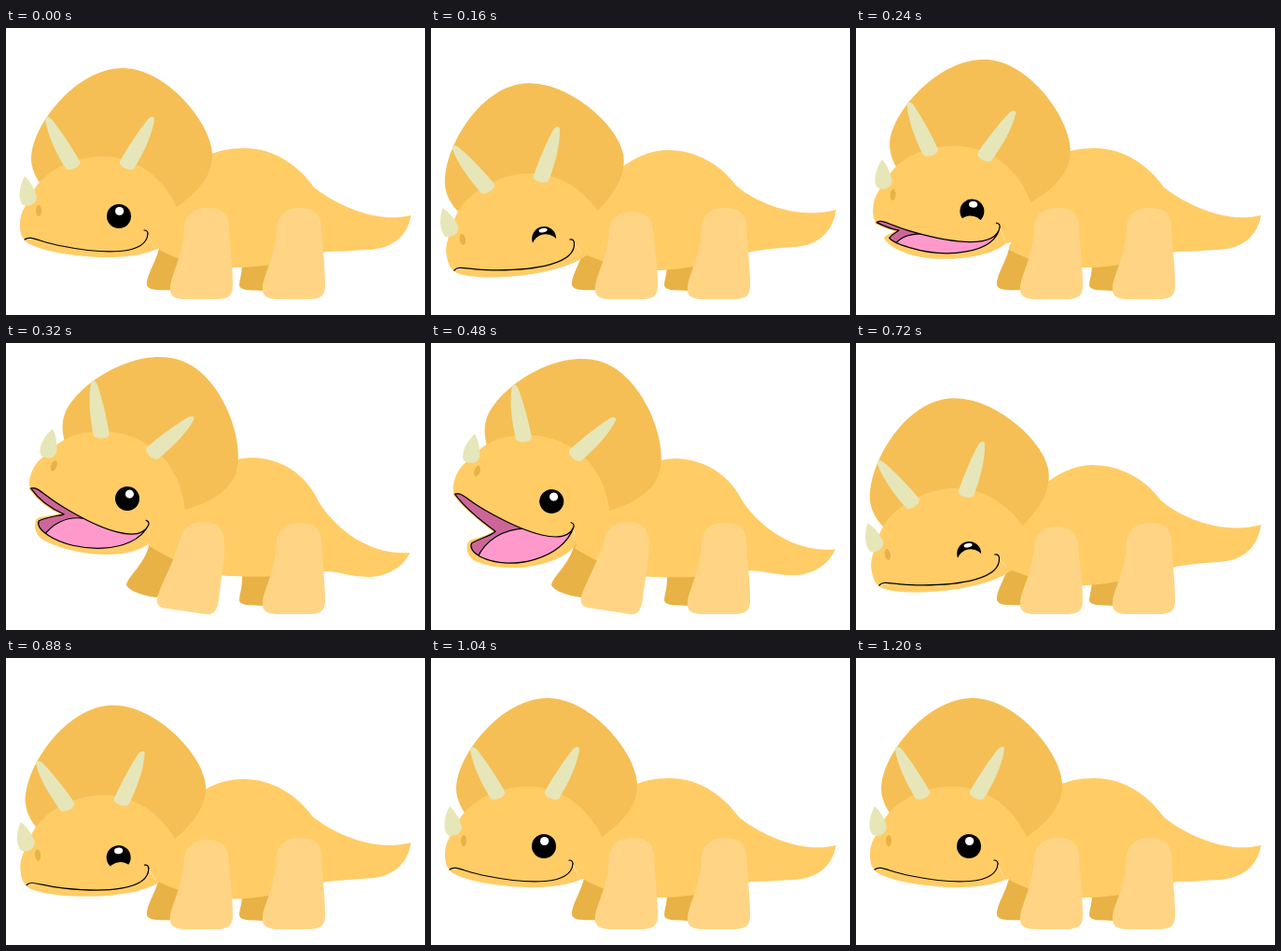
Animation, 449 px wide and 308 px high, one loop 1.44 s. Source, as an HTML page with a canvas:

```html
<!DOCTYPE html>
<html lang="en">
<head>
<meta charset="utf-8">
<title>Dinosaur</title>
<style>
  html, body { margin: 0; width: 100%; height: 100%; overflow: hidden; background: #fff; }
  canvas { display: block; width: 449px; height: 308px; }
</style>
</head>
<body>
<canvas id="stage" width="449" height="308"></canvas>
<script>
const ctx = document.getElementById('stage').getContext('2d');
const LOOP = 1440, TICK = 80;
const SKIN = '#ffcc66', FRILL = '#f5bf55', LEG = '#ffd585', SHADE = '#e8b246',
      HORN = '#e6e6b8', MOUTH = '#cc6699', TONGUE = '#ff99cc';
const PIVOT = { x: 121, y: 202 };   // eye centre in the resting pose

// head x, head y, head angle, mouth (0 shut, 1 half, 2 wide), eye open,
// body and foreleg (0 crouched, 1 resting, 2 raised)
const rest   = [121, 202, 0, 0, 1, 1, 1];
const crouch = [119.5, 217.2, -10.5, 0, 0, 0, 0];
const rear   = [130, 167, 20, 1, 1, 2, 2];
const peak   = [131, 162, 21.5, 1.3, 1, 2.08, 2.05];
const roar   = [127.5, 178, 15, 2, 1, 1.62, 2.12];
const nod    = [123, 198, 3.5, 0, 1, 1, 1];
const keys = [
  [0, rest], [160, crouch], [320, rear], [400, peak], [560, roar],
  [720, crouch], [1040, rest], [1120, nod], [1200, rest], [LOOP, rest]
];

const body = [
  'M180 180 C192 153 225 131 253 131 C285 131 310 147 326 168 C345 186 392 207 434 195 C430 222 412 234 388 235 C370 236 355 238 343 240 C310 251 270 260 243 260 C215 260 190 253 164 243 Z',
  'M180 180 C195 140 225 129 255 129 C290 129 315 150 330 171 C350 187 395 211 434 201 C430 225 412 237 388 238 C370 239 355 240 343 240 C310 250 270 258 243 257 C215 257 190 252 164 238 Z',
  'M180 180 C190 145 235 123 265 123 C302 125 324 146 336 172 C357 204 393 228 433 225 C424 243 405 251 389 251 C370 251 360 246 343 245 C310 250 270 252 243 250 C215 250 190 240 152 217 Z'
];
const foreleg = [
  'M191 216 C193 203 203 197 215 197 C229 197 237 204 238 216 C240 238 243 257 243 276 C243 287 239 290 228 291 L190 291 C178 290 175 286 176 277 C178 262 190 245 191 216 Z',
  'M191 212 C193 199 203 193 215 193 C231 193 238 199 239 212 C240 235 243 255 243 276 C243 287 239 290 228 291 L190 291 C178 290 175 286 176 277 C178 262 190 245 191 212 Z',
  'M187 209 C190 197 200 192 211 192 C226 192 233 199 234 212 C235 232 230 255 228 276 C226 288 222 292 214 291 L173 285 C163 284 160 280 163 270 C168 255 180 235 187 209 Z'
];
const farLeg = [
  'M165 232 C162 250 150 265 151 276 C153 281 160 282 185 281 C187 270 189 255 190 240 Z',
  'M154 212 C152 235 130 250 129 260 C133 267 150 272 162 273 C170 262 178 245 185 228 Z'
];
const farHind = 'M253 245 C254 262 250 270 250 276 C251 281 256 282 285 282 L285 245 Z';

const frill = 'M27 140 C27 105 75 43 125 43 C172 43 221 103 221 137 C221 160 203 178 183 192 L60 190 C45 180 27 160 27 140 Z';
const lip = 'M20 227 C26 222 34 229 60 234 C105 243 150 244 152 221';
const face = lip + ' L160 238 C180 232 192 215 183 192 C168 160 140 138 103 138 C70 138 38 155 28 178 C22 190 15 197 15 210 C15 218 16 224 20 227 Z';
const hook = 'M152 221 C152 218 150 217 148 217';
const jaw = [
  'M160 238 C140 247 105 247 85 245 C60 243 30 237 21 229 C21 229 20 228 20 227 L152 222 Z',
  'M160 238 C147 262 95 279 55 275 C42 274 36 264 37 256 C40 250 56 246 63 241 L152 222 Z',
  'M160 238 C156 264 106 298 72 296 C60 295 55 286 57 278 C64 271 78 264 80 257 L152 222 Z'
];
// lower rim of the mouth, from the smile's corner back to the snout
const rim = [
  ' C150 244 105 243 60 234 C45 231 35 229 30 228 C28 227 27 227 26 226 C24 225 22 225 20 227 Z',
  ' C148 257 88 276 55 268 C46 266 40 262 40 257 C46 250 56 246 63 241 C45 240 30 234 20 227 Z',
  ' C154 256 112 294 73 290 C65 288 60 284 61 279 C68 272 78 264 80 257 C60 248 38 240 20 227 Z'
];
const tongue = [
  'M30 234 C32 232 40 230 60 232 L165 215 L165 310 L30 310 Z',
  'M50 272 C54 255 66 242 84 238 L165 215 L165 310 L50 310 Z',
  'M72 292 C73 270 88 248 116 238 L165 215 L165 310 L72 310 Z'
];
const browHorn = 'M42 98 C42 94 46 95 49 98 C58 109 70 127 79 143 C81 149 68 154 64 151 C54 135 44 114 42 98 Z';
const noseHorn = 'M20 159 C26 164 32 175 33 182 C32 190 24 192 18 190 C13 185 13 172 20 159 Z';

const lerp = (a, b, t) => a + (b - a) * t;

function mix(a, b, t) {
  const to = b.match(/\d+/g);
  let i = 0;
  return a.replace(/\d+/g, n => lerp(+n, +to[i++], t));
}

function morph(shapes, m) {
  const i = Math.min(Math.floor(m), shapes.length - 2);
  return mix(shapes[i], shapes[i + 1], m - i);
}

function fill(d, color) {
  ctx.fillStyle = color;
  ctx.fill(new Path2D(d));
}

function stroke(d, color = '#000', width = 1.2) {
  ctx.strokeStyle = color;
  ctx.lineWidth = width;
  ctx.stroke(new Path2D(d));
}

function oval(x, y, rx, ry, color) {
  ctx.fillStyle = color;
  ctx.beginPath();
  ctx.ellipse(x, y, rx, ry, 0, 0, Math.PI * 2);
  ctx.fill();
}

function poseAt(t) {
  const i = keys.findIndex(k => k[0] > t);
  const [t0, a] = keys[i - 1], [t1, b] = keys[i];
  return a.map((v, n) => lerp(v, b[n], (t - t0) / (t1 - t0)));
}

function drawEye(open) {
  const { x } = PIVOT, y = PIVOT.y + lerp(9, 0, open);
  oval(x, y, 13, 13, '#000');
  oval(x + 0.6, y + lerp(-9, -5.5, open), 4.6, lerp(2.2, 4.5, open), '#fff');
  if (open < 1) oval(x, y + lerp(10.8, 30, open), 15.3, 15.3, SKIN);
}

function drawMouth(m) {
  ctx.lineCap = ctx.lineJoin = 'round';
  if (m > 0) {
    const cavity = lip + morph(rim, m), flesh = morph(tongue, m);
    stroke(cavity, SKIN, 3.4);
    fill(cavity, MOUTH);
    ctx.save();
    ctx.clip(new Path2D(cavity));
    fill(flesh, TONGUE);
    stroke(flesh);
    ctx.restore();
    stroke(cavity);
  } else {
    stroke(lip);
  }
  stroke(hook);
}

function drawHead(x, y, angle, mouth, eye) {
  ctx.save();
  ctx.translate(x, y);
  ctx.rotate(angle * Math.PI / 180);
  ctx.translate(-PIVOT.x, -PIVOT.y);
  fill(frill, FRILL);
  fill(morph(jaw, mouth), SKIN);
  fill(face, SKIN);
  oval(35, 196, 3, 6, SHADE);
  drawEye(eye);
  drawMouth(mouth);
  fill(noseHorn, HORN);
  fill(browHorn, HORN);
  ctx.translate(201, 0);
  ctx.scale(-1, 1);
  fill(browHorn, HORN);
  ctx.restore();
}

function draw(t) {
  const [x, y, angle, mouth, eye, lift, lean] = poseAt(t);
  ctx.fillStyle = '#fff';
  ctx.fillRect(0, 0, 449, 308);
  fill(mix(...farLeg, Math.min(Math.max(lean - 1, 0), 1)), SHADE);
  fill(farHind, SHADE);
  fill(morph(body, lift), SKIN);
  drawHead(x, y, angle, mouth, eye);
  fill(morph(foreleg, lean), LEG);
  ctx.save();
  ctx.translate(99, 0);
  fill(foreleg[1], LEG);
  ctx.restore();
}

const start = performance.now();
function frame() {
  const t = (performance.now() - start) % LOOP;
  draw(Math.floor(t / TICK) * TICK);
  requestAnimationFrame(frame);
}
frame();
</script>
</body>
</html>
```
